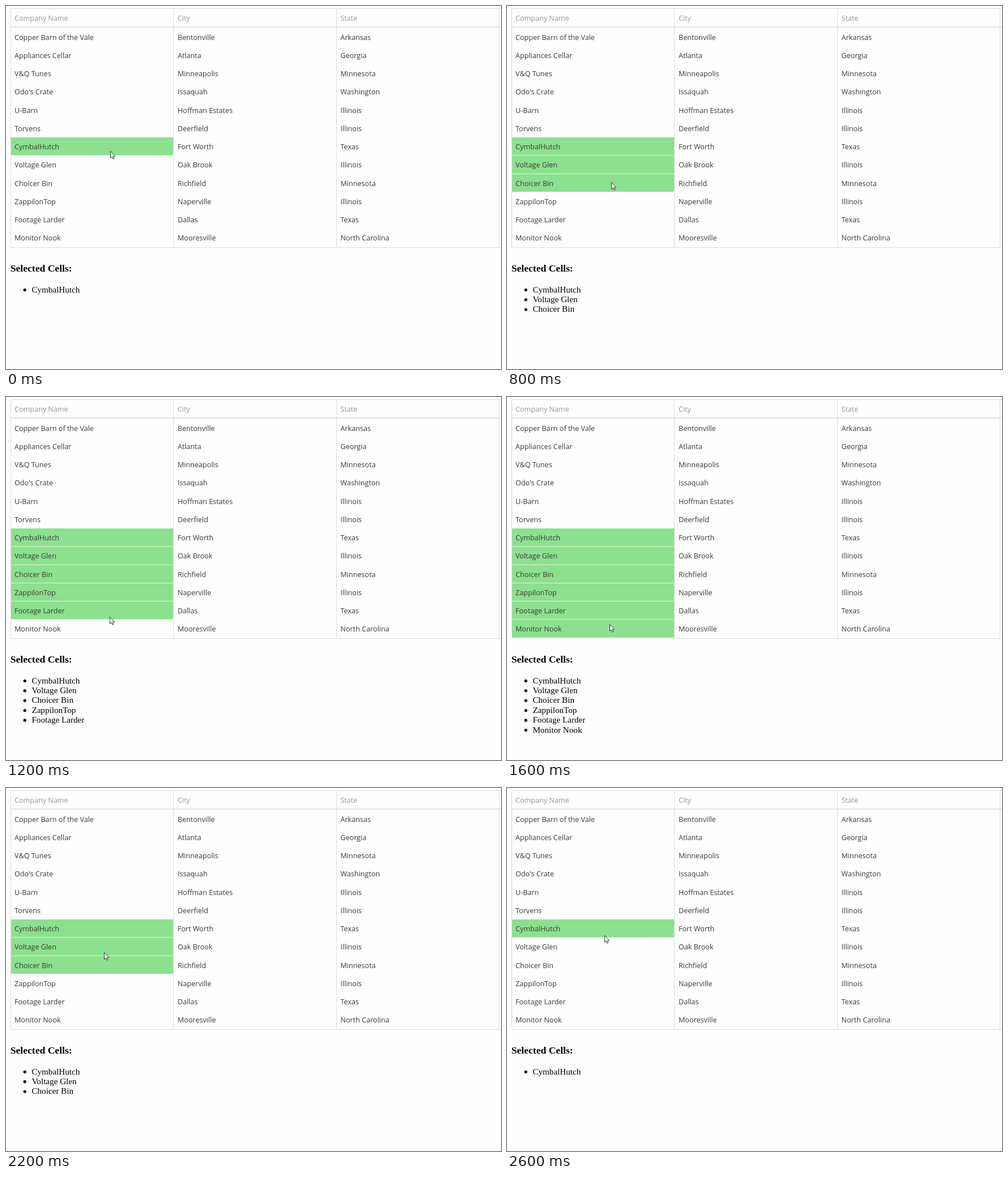
Recreate the animation shown at these times as an HTML page. Size 874 by 641 pixels, loop 2800 ms.

```html
<!DOCTYPE html>
<html lang="en">
<head>
<meta charset="utf-8">
<title>Cell selection</title>
<style>
  html, body { margin: 0; height: 100%; overflow: hidden; background: #fefefe; }
  svg { display: block; }
  .grid text { font: 12.6px "Open Sans", sans-serif; fill: #3a3a3a; }
  .grid text.head { fill: #969696; }
  .grid path { stroke: #ddd; fill: none; }
  .list text { font: 15.15px "Liberation Serif", serif; }
  .list text.title { font-size: 17.6px; font-weight: bold; }
  .cell { fill: #8ce08f; }
</style>
</head>
<body>
<svg width="874" height="641" viewBox="0 0 874 641">
  <g class="cells"></g>
  <g class="grid">
    <path d="M874 4.5H8.5V426.5H874M295.5 4V426M583.5 4V426M870.5 4V426"/>
    <path d="M8 37.3H874" stroke-width="1.6"/>
  </g>
  <g class="list"><text class="title" x="7.7" y="469">Selected Cells:</text></g>
  <path class="cursor" fill="#fff" stroke="#222" stroke-width=".9" stroke-linejoin="round"
    d="M.5 .5V12.6L3.2 10L5 14.2L6.9 13.4L5.1 9.3H8.6Z"/>
</svg>
<script>
const columns = [15, 303, 590.5];
const headers = ["Company Name", "City", "State"];
const rows = [
  ["Copper Barn of the Vale", "Bentonville", "Arkansas"],
  ["Appliances Cellar", "Atlanta", "Georgia"],
  ["V&Q Tunes", "Minneapolis", "Minnesota"],
  ["Odo's Crate", "Issaquah", "Washington"],
  ["U-Barn", "Hoffman Estates", "Illinois"],
  ["Torvens", "Deerfield", "Illinois"],
  ["CymbalHutch", "Fort Worth", "Texas"],
  ["Voltage Glen", "Oak Brook", "Illinois"],
  ["Choicer Bin", "Richfield", "Minnesota"],
  ["ZappilonTop", "Naperville", "Illinois"],
  ["Footage Larder", "Dallas", "Texas"],
  ["Monitor Nook", "Mooresville", "North Carolina"]
];
const rowHeight = 32.22, firstSelected = 6, stepTime = 200;

// Pointer position and number of selected cells for each step
const steps = [
  [184, 256, 1], [183, 256, 1], [184, 257, 1], [184, 270, 2], [184, 311, 3],
  [184, 350, 4], [183, 388, 5], [182, 408, 6], [181, 401, 6], [179, 377, 5],
  [176, 335, 4], [173, 290, 3], [172, 273, 2], [172, 260, 1]
];

const $ = selector => document.querySelector(selector);
function add(parent, tag, attributes, text = "") {
  const node = document.createElementNS("http://www.w3.org/2000/svg", tag);
  for (const name in attributes) node.setAttribute(name, attributes[name]);
  node.textContent = text;
  return parent.appendChild(node);
}

headers.forEach((text, c) => add($(".grid"), "text", { class: "head", x: columns[c], y: 25.6 }, text));
rows.forEach((row, r) => row.forEach((text, c) =>
  add($(".grid"), "text", { x: columns[c], y: 59.8 + r * rowHeight }, text)));

const selection = rows.slice(firstSelected).map(([name], i) => {
  const item = add($(".list"), "g");
  add(item, "circle", { cx: 33.2, cy: 501.3 + i * 17.4, r: 2.6 });
  add(item, "text", { x: 45.4, y: 505.5 + i * 17.4 }, name);
  const cell = add($(".cells"), "rect",
    { class: "cell", x: 8.5, y: 232.1 + i * rowHeight, width: 286.7, height: 31.5 });
  return [item, cell];
});

function draw(now) {
  const [x, y, count] = steps[Math.floor(now / stepTime) % steps.length];
  $(".cursor").setAttribute("transform", `translate(${x} ${y})`);
  selection.forEach((parts, i) => parts.forEach(part =>
    part.setAttribute("visibility", i < count ? "visible" : "hidden")));
  requestAnimationFrame(draw);
}
draw(0);
</script>
</body>
</html>
```
